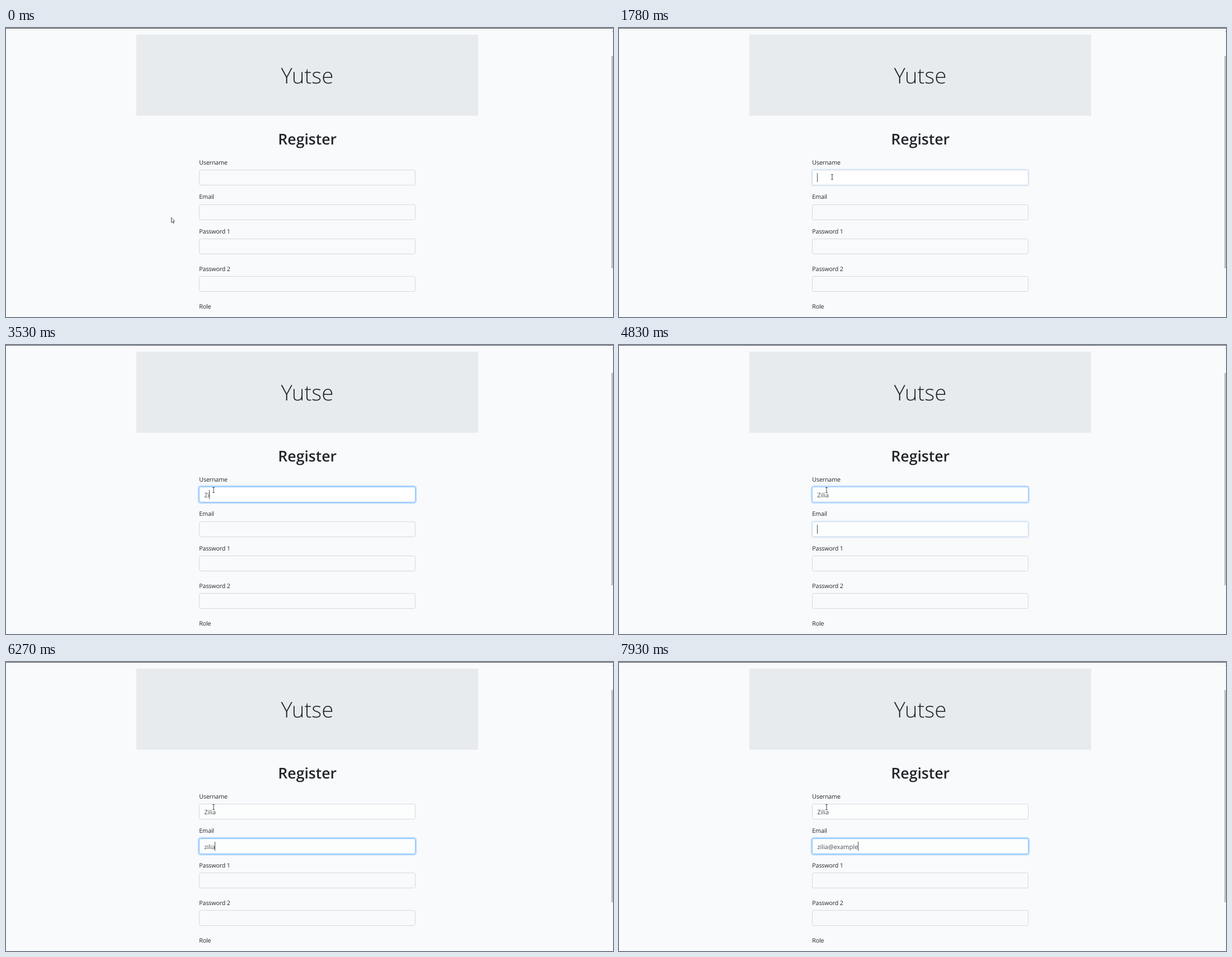
Animation of 1085x516 px, one loop 8000 ms. Source, as an HTML page:

```html
<!DOCTYPE html>
<html lang="en">
<head>
<meta charset="utf-8">
<title>Register</title>
<style>
html, body { margin: 0; width: 100%; height: 100%; overflow: hidden; background: #f8fafc; }
svg { display: block; width: 1085px; height: 516px; }
text { font-family: "Open Sans", "Noto Sans", sans-serif; fill: #212529; text-rendering: geometricPrecision; }
.title { font-size: 38.5px; font-weight: 300; text-anchor: middle; }
.head { font-size: 26.6px; font-weight: 600; text-anchor: middle; }
.label { font-size: 10.7px; letter-spacing: -.014em; }
.value { font-size: 10.9px; fill: #495057; }
</style>
</head>
<body>
<svg id="stage" viewBox="0 0 1085 516">
  <rect width="1085" height="516" fill="#f8fafc"/>
  <rect width="1085" height="1" fill="#4a4d52"/>
  <rect x="1082" y="50" width="3" height="379" fill="#c1c1c1"/>
  <rect x="1084" y="6" width="1" height="1" fill="#606060"/>
  <rect x="233" y="12" width="611" height="144.5" fill="#e7ebee"/>
  <text class="title" x="538.5" y="99">Yutse</text>
  <text class="head" x="538.7" y="208">Register</text>
  <g id="form"></g>
  <rect id="caret" width="1" height="16" fill="#495057"/>
  <path id="arrow" d="M.5 .5V9.3L2.5 7.5L3.9 10.7L5.2 10.1L3.8 7.1H6.5Z" fill="#fff" stroke="#33363a" stroke-width=".85"/>
  <path id="beam" d="M-1.8-4.5H1.8M-1.8 4.5H1.8M0-4.5V4.5" fill="none" stroke="#3a3d41" stroke-width=".95"/>
</svg>
<script>
const LOOP = 8000, BLINK = 530;
const FOCUS = [1680, 4800];
const NS = "http://www.w3.org/2000/svg";
const form = document.getElementById("form");
const caret = document.getElementById("caret");
const arrow = document.getElementById("arrow");
const beam = document.getElementById("beam");

function add(tag, attrs, text = "") {
  const el = document.createElementNS(NS, tag);
  for (const k in attrs) el.setAttribute(k, attrs[k]);
  el.textContent = text;
  form.append(el);
  return el;
}

function makeField(label, labelY, y) {
  add("text", { class: "label", x: 345.3, y: labelY }, label);
  if (!y) return null;
  const glow = add("rect", { x: 344, y: y - 1.5, width: 389, height: 30, rx: 4,
    fill: "none", stroke: "#007bff", "stroke-width": 2.3, opacity: 0 });
  const box = add("rect", { x: 345.5, y, width: 386, height: 27, rx: 2.8, "stroke-width": .95 });
  const value = add("text", { class: "value", x: 354.5, y: y + 18.1 });
  return { y, glow, box, value };
}

const fields = [
  makeField("Username", 244, 253.5),
  makeField("Email", 305.4, 315.5),
  makeField("Password 1", 366.7, 376.5),
  makeField("Password 2", 433.8, 443.5),
  makeField("Role", 500.5)
].filter(Boolean);

const typing = [
  { text: "Zilia", keys: [3000, 3530, 3680, 3880, 4020] },
  { text: "zilia@example",
    keys: [5540, 5780, 5900, 6060, 6270, 6640, 6840, 7100, 7280, 7470, 7680, 7770, 7930] }
];

const lerp = (a, b, p) => a + (b - a) * p;
const easeOut = (p, n) => 1 - Math.pow(1 - p, n);
const hex = (a, b, p) => "rgb(" + a.map((v, i) => Math.round(lerp(v, b[i], p))) + ")";

// Progress in n jumps; the first jump happens at the start time.
function stepped(t, start, end, n) {
  if (t < start) return 0;
  return Math.min(1, (Math.floor((t - start) / (end - start) * (n - 1) + 1e-6) + 1) / n);
}

// Focus ring transition, in four jumps.
function ring(t, [a, b, c, d]) {
  return t < a ? 0 : t < b ? .04 : t < c ? .22 : t < d ? .7 : 1;
}

function drawFields(t) {
  const on = ring(t, [1680, 1780, 1820, 1860]);
  const moved = ring(t, [4800, 4830, 4880, 4920]);
  const focus = [on - moved, moved, 0, 0];
  fields.forEach((f, i) => {
    f.glow.setAttribute("opacity", .27 * focus[i]);
    f.box.setAttribute("stroke", hex([211, 216, 222], [128, 189, 255], focus[i]));
    const used = i < 2 && t >= FOCUS[i];
    f.box.setAttribute("fill", !used ? "#f8fafc" : i === 0 && t < FOCUS[1] ? "#fff" : "#fcfdfd");
  });
}

function drawTyping(t) {
  typing.forEach(({ text, keys }, i) => {
    const s = text.slice(0, keys.filter(k => k <= t).length);
    if (fields[i].value.textContent !== s) fields[i].value.textContent = s;
  });
  const i = t < FOCUS[1] ? 0 : 1;
  const last = Math.max(FOCUS[i], ...typing[i].keys.filter(k => k <= t));
  const shown = t >= FOCUS[0] && Math.floor((t - last) / BLINK) % 2 === 0;
  caret.setAttribute("visibility", shown ? "visible" : "hidden");
  const { value } = fields[i];
  const width = value.textContent ? value.getComputedTextLength() : 0;
  caret.setAttribute("x", 354 + Math.round(width));
  caret.setAttribute("y", i ? 321 : 259);
}

function drawPointer(t) {
  const p = stepped(t, 650, 1440, 17);
  const q = stepped(t, 2120, 2380, 5);
  const x = lerp(lerp(295, 381, easeOut(p, 1.5)), 371, q);
  const y = lerp(lerp(338, 266, easeOut(p, 1.2)), 259, q);
  const inside = y < 281;
  arrow.setAttribute("visibility", inside ? "hidden" : "visible");
  beam.setAttribute("visibility", inside ? "visible" : "hidden");
  arrow.setAttribute("transform", `translate(${Math.round(x)} ${Math.round(y)})`);
  beam.setAttribute("transform", `translate(${Math.round(x)} ${Math.round(y)})`);
}

function draw(t) {
  drawFields(t);
  drawTyping(t);
  drawPointer(t);
}

const start = performance.now();
function tick() {
  draw((performance.now() - start) % LOOP);
  requestAnimationFrame(tick);
}
tick();
</script>
</body>
</html>
```
